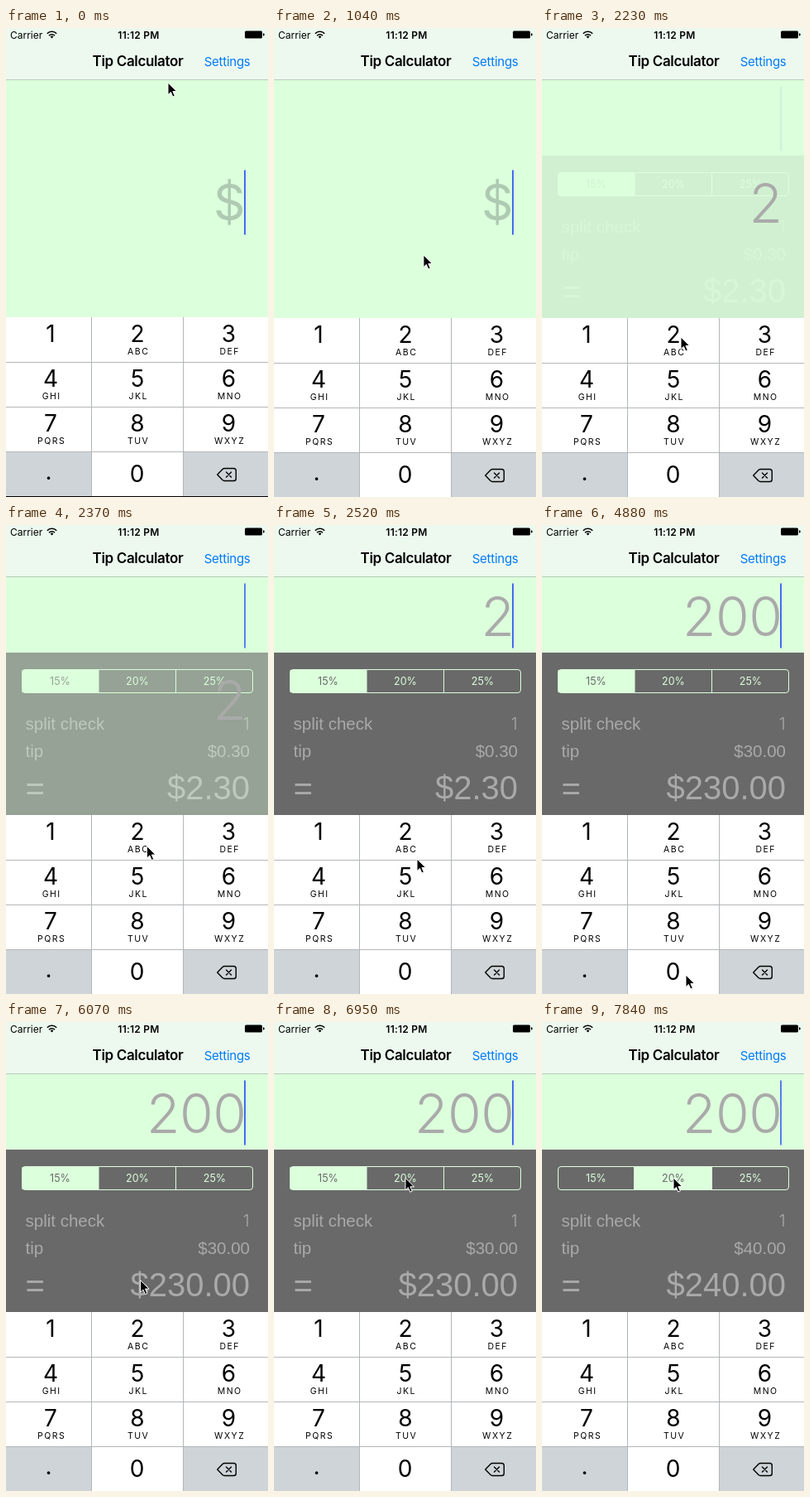
Animation of 317 by 566 pixels, one loop 7990 ms. Source, as an HTML page:

```html
<!DOCTYPE html>
<html lang="en">
<head>
<meta charset="utf-8">
<title>Tip Calculator</title>
<style>
  html, body { margin: 0; width: 100%; height: 100%; overflow: hidden; background: #000; }
  svg { display: block; width: 317px; height: 566px; }
  text { font-family: Inter, Roboto, sans-serif; white-space: pre; }
  .mid { text-anchor: middle; }
  .end { text-anchor: end; }
  .status { font-size: 12px; }
  .clock { font-size: 12px; font-weight: 600; letter-spacing: .25px; }
  .title { font-size: 17px; font-weight: 600; letter-spacing: -.35px; }
  .link { font-size: 15px; letter-spacing: -.25px; fill: #007aff; }
  .digit { font-size: 28px; }
  .letters { font-size: 10.5px; letter-spacing: 1.5px; }
  .amount { font-size: 66px; font-weight: 350; letter-spacing: -.5px; fill: #aaa; }
  .hint { font-size: 60px; fill: #afcab2; }
  .seg { font-size: 12.5px; }
  .label, .total { font-family: "Liberation Sans", Arial, sans-serif; fill: #a9a9a9; }
  .label { font-size: 20.5px; }
  .total { font-size: 40px; }
  .count { font-size: 20px; font-weight: 300; fill: #a9a9a9; }
</style>
</head>
<body>
<svg viewBox="0 0 317 566">
  <rect y="62" width="317" height="288" fill="#dcffdc"/>
  <rect width="317" height="62" fill="#edf9ef"/>
  <path d="M0 62.5H317" stroke="#b4cbb8"/>

  <text class="status" x="5" y="12.5">Carrier</text>
  <g fill="none" stroke="#000" stroke-width="1.6">
    <path d="M49.8 6.8a7.8 7.8 0 0 1 11.4 0M52 9.2a4.8 4.8 0 0 1 7 0"/>
    <path d="M53.6 10.4a2.8 2.8 0 0 1 3.8 0L55.5 12.6Z" fill="#000" stroke="none"/>
  </g>
  <text class="clock mid" x="160.5" y="12.5">11:12 PM</text>
  <rect x="289" y="3.5" width="21" height="9" rx="1.6"/>
  <path d="M311 6.3q1.8 .3 1.8 1.7t-1.8 1.7z"/>

  <text class="title mid" x="159.5" y="46">Tip Calculator</text>
  <text class="link end" x="295.5" y="45.5">Settings</text>

  <g id="panel">
    <rect y="154" width="317" height="196" fill="#696969"/>
    <rect id="chosen" y="175" width="93" height="27" fill="#dcffdc"/>
    <path d="M111.5 175V202M205.5 175V202" stroke="#dcffdc"/>
    <rect x="19.5" y="174.5" width="279" height="28" rx="3.5" fill="none" stroke="#dcffdc"/>
    <text class="seg mid" x="65.5" y="193">15%</text>
    <text class="seg mid" x="159" y="193">20%</text>
    <text class="seg mid" x="252.5" y="193">25%</text>
    <text class="label" x="23.5" y="247">split check</text>
    <text class="count end" x="294.5" y="247">1</text>
    <text class="label" x="23.5" y="280">tip</text>
    <text class="label end" id="tip" x="295" y="280"></text>
    <text class="total" x="23.5" y="332">=</text>
    <text class="total end" id="total" x="295" y="331"></text>
  </g>

  <text class="hint end" id="hint" x="289.5" y="232">$</text>
  <text class="amount end" id="amount" x="290.5"></text>
  <rect id="caret" x="288" width="2" height="78" fill="#426bf2"/>

  <g id="pad">
    <rect y="350" width="317" height="216" fill="#fff"/>
    <path d="M0 512H104V566H0ZM214 512H317V566H214Z" fill="#ced4d8"/>
    <rect id="press" x="104" y="513" width="110" height="53" fill="#ced4d8"/>
    <path d="M103.5 350V566M214.5 350V566M0 404.5H317M0 458.5H317M0 512.5H317" stroke="#b3b6b8"/>
    <g id="keys"></g>
    <g fill="none" stroke="#000" stroke-width="1.4" stroke-linejoin="round" stroke-linecap="round">
      <path d="M255.7 540L262 533.4Q263 532.5 264.3 532.5H275.5Q278.3 532.5 278.3 535.3V544.7Q278.3 547.5 275.5 547.5H264.3Q263 547.5 262 546.6Z"/>
      <path d="M266.5 537L272.5 543M272.5 537L266.5 543"/>
    </g>
  </g>

  <path id="mouse" d="M0 0V14.6L3.4 11.4L5.8 17L8.3 15.9L5.9 10.5H10.6Z" stroke="#fff" stroke-width="1"/>
</svg>
<script>
const LOOP = 7990;
const $ = id => document.getElementById(id);
const clamp = v => Math.min(1, Math.max(0, v));
const ease = p => p * p * (3 - 2 * p);
const money = v => '$' + v.toFixed(2);

// The screen refreshes in bursts: [first time, number of updates]
const ticks = [[0, 1], [150, 1], [450, 8], [1630, 2], [2230, 8], [3400, 2],
               [3990, 1], [4580, 3], [5470, 8], [6650, 3], [7400, 4]]
  .flatMap(([start, n]) => Array.from({ length: n }, (_, i) => start + Math.floor(i * 14.8) * 10));

// Pointer stops: time, x, y, eased on arrival
const path = [
  [300, 196, 66], [1480, 174, 369, 1], [1780, 168, 373], [2230, 168, 373],
  [2520, 173, 403], [3260, 174, 536], [3550, 174, 543], [5330, 174, 543],
  [6510, 157, 200, 1], [6950, 159, 188]
];

function pointer(t) {
  const i = path.findIndex(p => p[0] >= t);
  if (i === 0) return path[0].slice(1, 3);
  if (i < 0) return path[path.length - 1].slice(1, 3);
  const a = path[i - 1], b = path[i];
  let p = (t - a[0]) / (b[0] - a[0]);
  if (b[3]) p = ease(p);
  return [a[1] + (b[1] - a[1]) * p, a[2] + (b[2] - a[2]) * p];
}

function caretAlpha(t) {
  if (t >= 3990 && t < 4580) return 1;
  const period = 1035;
  const anchor = t < 2230 ? 1735 : t < 3990 ? 2520 : 4880;
  const phase = ((t - anchor) % period + period) % period;
  return phase < 600 ? 1 - clamp((phase - 420) / 100) : clamp((phase - 725) / 190);
}

const columns = [54, 159, 269.5];
const letters = ['', 'ABC', 'DEF', 'GHI', 'JKL', 'MNO', 'PQRS', 'TUV', 'WXYZ'];
const label = (cls, x, y, s) => `<text class="${cls} mid" x="${x}" y="${y}">${s}</text>`;
$('keys').innerHTML = letters.map((s, i) => {
  const x = columns[i % 3], y = 380 + 54 * Math.floor(i / 3);
  return label('digit', x, y, i + 1) + label('letters', x + 1.2, y + 15, s);
}).join('') + label('digit', 158.5, 549, 0) + label('digit', 51.5, 546, '.');

const segments = [...document.querySelectorAll('.seg')];

function draw(now) {
  const time = now % LOOP;
  const t = ticks.filter(v => v <= time).pop();
  const bill = t < 2230 ? 0 : t < 3990 ? 2 : t < 4580 ? 20 : 200;
  const pick = t < 7550 ? 0 : 1;
  const tip = bill * [.15, .2][pick];
  const reveal = t < 2230 ? 0 : ease(clamp((t - 2165) / 355));
  const slide = t < 2380 ? 0 : reveal;

  $('panel').setAttribute('opacity', reveal);
  $('hint').setAttribute('visibility', bill ? 'hidden' : 'visible');
  $('amount').textContent = bill || '';
  $('amount').setAttribute('y', 235 - 101.5 * slide);
  $('tip').textContent = money(tip);
  $('total').textContent = money(bill + tip);
  $('chosen').setAttribute('x', pick ? 112 : 19.5);
  segments.forEach((s, i) => s.setAttribute('fill', i === pick ? '#696969' : '#dcffdc'));
  $('caret').setAttribute('y', bill ? 70.5 : 171.5);
  $('caret').setAttribute('opacity', caretAlpha(t));
  $('press').setAttribute('opacity', t >= 4580 && t < 4730 ? .6 : 0);
  $('pad').setAttribute('transform', `translate(0 ${t < 150 ? -1 : 0})`);
  const [x, y] = pointer(t);
  $('mouse').setAttribute('transform', `translate(${x} ${y})`);
}

const begin = performance.now();
function loop() {
  draw(performance.now() - begin);
  requestAnimationFrame(loop);
}
loop();
</script>
</body>
</html>
```
